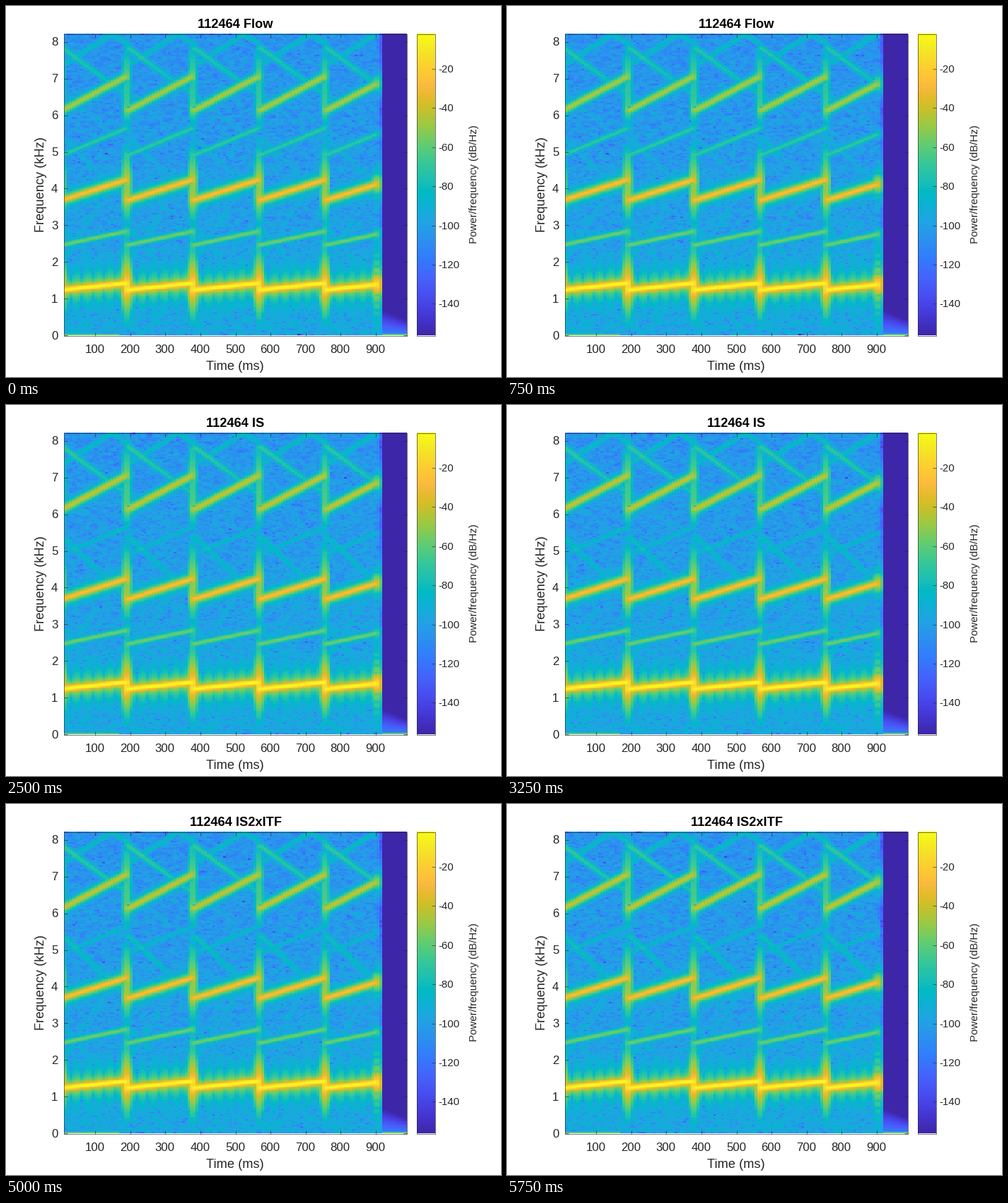
A matplotlib script that plays this animation: 700 by 525 pixels, repeating every 6250 ms.

```python
import numpy as np
import matplotlib.pyplot as plt
from matplotlib.animation import FuncAnimation
from matplotlib.colors import LinearSegmentedColormap
from matplotlib.patches import Rectangle

W, H, DPI = 700, 525, 100
PT = 72 / DPI                         # points per pixel
FS, WIN, HOP = 16384, 512, 128
PERIOD, DELAY = 0.188, 0.0025         # glide length and first jump, seconds
DB_MIN, DB_MAX = -156.4, -2.5
X0, X1, Y0, Y1 = 81.5, 566.5, 39.5, 466.5
BAR0, BAR1 = 580.5, 606.5
INK = "#262626"
THIN = 0.6 * PT

plt.rcParams["font.family"] = "Liberation Sans"

STOPS = [
    (0, "#3E26A8"), (4, "#4537D5"), (8, "#484DF0"), (12, "#4563FD"),
    (16, "#327CFC"), (20, "#2B91EF"), (24, "#20A5E3"), (28, "#08B5D0"),
    (30, "#02BAC3"), (32, "#19BFB6"), (36, "#37C897"), (40, "#64CD6F"),
    (44, "#9DC943"), (48, "#D1BF27"), (50, "#E6BB2D"), (52, "#F8BA3D"),
    (53, "#FEBE3C"), (56, "#FCCF30"), (60, "#F5E924"), (63, "#F9FB15"),
]
CMAP = LinearSegmentedColormap.from_list("sea", [(i / 63, c) for i, c in STOPS])

# Levels in dB shared by all scenes, by harmonic number
BASE = {1: -3, 2: -57, 3: -27, 6: -80, 8: -92, 11: -87, 13: -87, 15: -86}
# Title, levels of harmonics 4, 5, 7 and 9, noise tilt over the band
SCENES = [
    ("112464 Flow", -70, -45, -73, -88, -10),
    ("112464 GT", -74, -44, -74, -89, -8),
    ("112464 IS", -82, -40, -70, -80, -9),
    ("112464 IS2", -75, -44, -74, -85, -9),
    ("112464 IS2xITF", -83, -40, -69, -78, -10),
]
T = np.arange(FS) / FS
RAMP = ((T - DELAY) / PERIOD) % 1


def phase():
    """Phase of a repeating upward glide with a short chirp at each jump."""
    soft = np.hanning(49)
    soft /= soft.sum()
    glide = np.convolve(np.pad(RAMP, 24, mode="edge"), soft, "valid")
    dist = (T - DELAY + PERIOD / 2) % PERIOD - PERIOD / 2
    blip = np.exp(-0.5 * (dist / 0.0005) ** 2)
    return 2 * np.pi * np.cumsum(1219 + 189 * glide + 110 * blip) / FS


def noise(rng, tilt):
    spec = np.fft.rfft(rng.standard_normal(FS))
    spec *= 10 ** (tilt * np.linspace(0, 1, len(spec)) / 20)
    return np.fft.irfft(spec, FS) * 10 ** (-75 / 20)


def spectrogram(k):
    _, h4, h5, h7, h9, tilt = SCENES[k]
    levels = {**BASE, 4: h4, 5: h5, 7: h7, 9: h9}
    rng = np.random.default_rng(40 + k)
    ph = phase()
    sig = noise(rng, tilt)
    for h, level in levels.items():
        amp = 10 ** (level / 20)
        if h >= 7:                    # folded harmonics weaken as they glide
            amp = amp * 1.4 * np.exp(-1.1 * RAMP)
        sig += amp * np.sin(h * ph)
    fade = np.clip((0.9055 - T) / 0.005, 0, 1)
    sig *= fade * fade * (3 - 2 * fade)

    win = np.hanning(WIN + 1)[:-1]
    starts = np.arange(0, FS - WIN + 1, HOP)
    parts = sig[starts[:, None] + np.arange(WIN)] * win
    power = np.abs(np.fft.rfft(parts, axis=1)) ** 2 * 4 / win.sum() ** 2
    db = 10 * np.log10(power.T + 1e-17)

    # Silent tail: only low-frequency leakage that dies away
    time = (starts + WIN / 2) / FS
    tail = time > 0.918
    khz = np.linspace(0, FS / 2000, len(db))[:, None]
    reach = np.linspace(0.65, 0.4, tail.sum())
    db[:, tail] = -114 - 42 * khz / reach
    db[0, tail] = -60
    db[0, time < 0.165] = -62
    return np.clip(db, DB_MIN, DB_MAX)


def line(x, y):
    ax.plot(x, y, color=INK, lw=THIN, solid_capstyle="butt", zorder=3)


def label(x, y, s, size, color=INK, **kw):
    return ax.text(x, y, s, fontsize=size * PT, color=color, va="baseline",
                   rotation_mode="anchor", **kw)


def box(x0, x1):
    ax.add_patch(Rectangle((x0, Y0), x1 - x0, Y1 - Y0, fill=False,
                           ec=INK, lw=THIN, zorder=3))


def snap(v):
    return np.floor(v) + 0.5


fig = plt.figure(figsize=(W / DPI, H / DPI), dpi=DPI, facecolor="white")
ax = fig.add_axes([0, 0, 1, 1])
ax.axis("off")

maps = [spectrogram(k) for k in range(len(SCENES))]
style = dict(cmap=CMAP, interpolation="nearest", aspect="auto", origin="lower")
img = ax.imshow(maps[0], extent=(X0, X1, Y1, Y0),
                vmin=DB_MIN, vmax=DB_MAX, **style)
ax.imshow(np.linspace(0, 1, 256)[:, None], extent=(BAR0, BAR1, Y1, Y0), **style)
ax.set_xlim(0, W)
ax.set_ylim(H, 0)

box(X0, X1)
box(BAR0, BAR1)

for ms in range(100, 1000, 100):
    x = snap(X0 + (ms - 11.72) / 976.56 * (X1 - X0))
    line([x, x], [Y1, Y1 - 5])
    line([x, x], [Y0, Y0 + 5])
    label(x, 491, str(ms), 16.7, ha="center")

for k in range(9):
    y = snap(Y1 - (k + 0.016) / 8.224 * (Y1 - Y0))
    line([X0, X0 + 5], [y, y])
    line([X1, X1 - 5], [y, y])
    label(73.5, y + 6, str(k), 16.7, ha="right")

for db in range(-140, 0, 20):
    y = snap(Y1 - (db - DB_MIN) / (DB_MAX - DB_MIN) * (Y1 - Y0))
    line([BAR1, BAR1 - 5], [y, y])
    label(611, y + 5.5, f"-{-db}", 15, ha="left")

label(324, 515, "Time (ms)", 18.3, ha="center")
label(54.5, 253, "Frequency (kHz)", 18.3, ha="center", rotation=90)
label(666, 252.5, "Power/frequency (dB/Hz)", 15, ha="center", rotation=90)
title = label(324.5, 31, SCENES[0][0], 18.3, "black", ha="center", weight="bold")


def draw(k):
    img.set_data(maps[k])
    title.set_text(SCENES[k][0])
    return img, title


anim = FuncAnimation(fig, draw, frames=len(SCENES), interval=1250,
                     repeat=True, repeat_delay=0)
plt.show()
```
